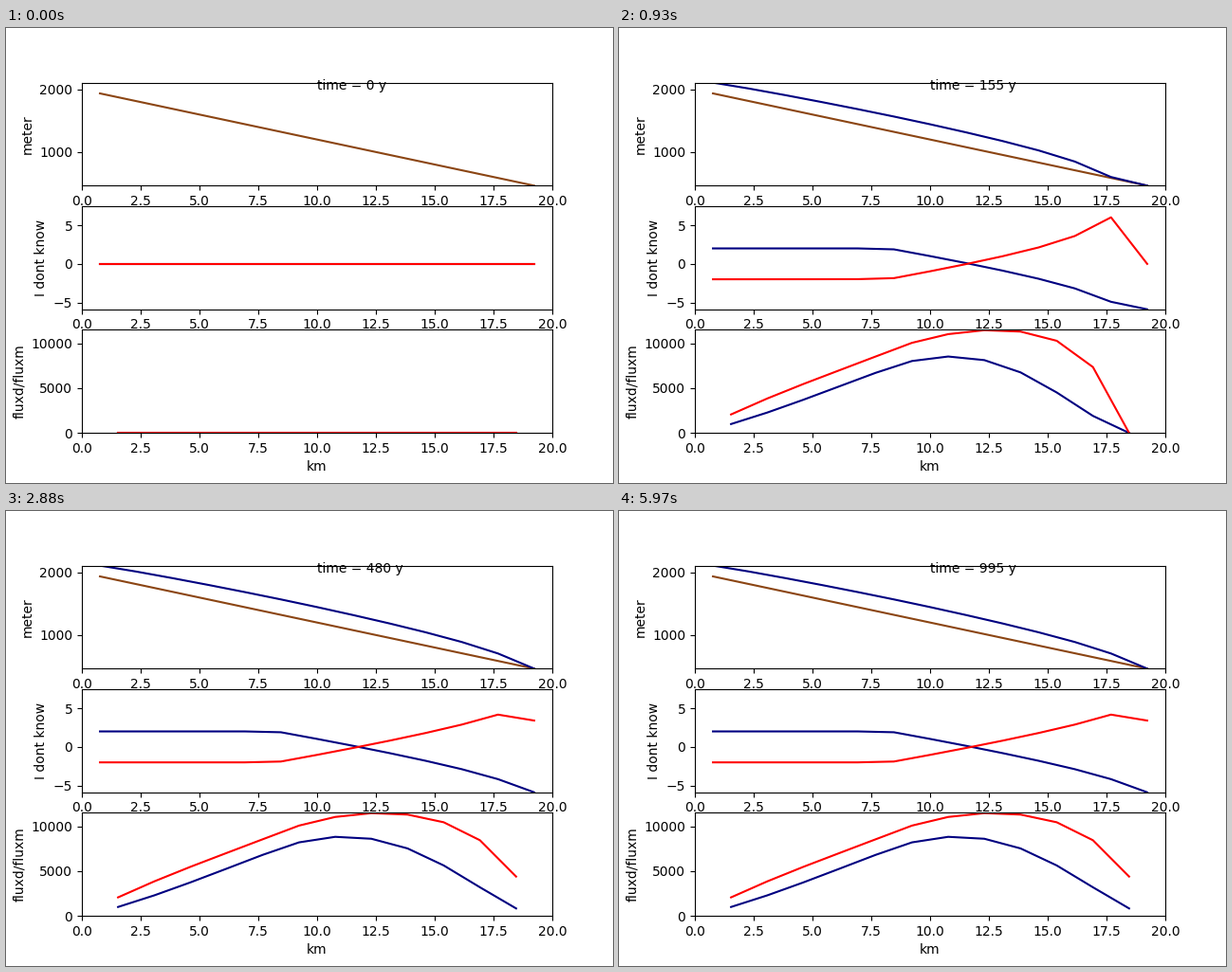
Recreate the animation shown at these times as a matplotlib script. Size 640x480 px, loop 6 s.

```python
import numpy as np
import matplotlib.pyplot as plt
from matplotlib.animation import FuncAnimation

# Glacier flow line on an inclined bed
N, LENGTH = 13, 20e3
DX = LENGTH / N
X = (np.arange(N) + 0.5) * DX
X_EDGE = np.arange(1, N) * DX
BED = 2000 - 0.08 * X

YEAR = 365 * 24 * 3600
RHO_G3 = (917 * 9.81) ** 3
DEFORM = 0.4 * 1.9e-24 * YEAR * RHO_G3
SLIDE = 5.7e-20 * YEAR * RHO_G3
ELA, GRADIENT, MAX_BALANCE = 1300, 0.007, 2

DT = 0.25
STEP_YEARS = 5
FRAMES = 200


def edge_mean(a):
    return (a[:-1] + a[1:]) / 2


def diagnose(ice):
    """Surface, mass balance, flux gain and both fluxes for a thickness."""
    surface = BED + ice
    balance = np.minimum(GRADIENT * (surface - ELA), MAX_BALANCE)
    slope3 = (-np.diff(surface) / DX) ** 3
    deform = DEFORM * edge_mean(ice ** 5) * slope3
    slide = SLIDE * edge_mean(ice ** 3) * slope3
    total = np.concatenate(([0], deform + slide, [0]))
    return surface, balance, -np.diff(total) / DX, deform, slide


def advance(ice, years):
    for _ in range(round(years / DT)):
        _, balance, gain, _, _ = diagnose(ice)
        ice = np.maximum(ice + DT * (balance + gain), 0)
    return ice


def initial_slab():
    """Uniform slab whose tongue is 126 m thick at 14.6 km in year 70."""
    low, high = 120.0, 200.0
    for _ in range(20):
        mid = (low + high) / 2
        if advance(np.full(N, mid), 70)[9] < 126:
            low = mid
        else:
            high = mid
    return np.full(N, mid)


def run():
    # The first picture is empty: nothing has been computed yet
    states = [(np.zeros(N),) * 3 + (np.zeros(N - 1),) * 2]
    ice = initial_slab()
    for _ in range(1, FRAMES):
        ice = advance(ice, STEP_YEARS)
        states.append(diagnose(ice))
    return states


states = run()

fig, (ax_top, ax_mid, ax_low) = plt.subplots(3, 1, figsize=(6.4, 4.8), dpi=100)
km, km_edge = X / 1000, X_EDGE / 1000

ax_top.plot(km, BED, color="saddlebrown")
surface_line, = ax_top.plot([], [], color="navy")
balance_line, = ax_mid.plot([], [], color="navy")
gain_line, = ax_mid.plot([], [], color="red")
deform_line, = ax_low.plot([], [], color="navy")
slide_line, = ax_low.plot([], [], color="red")
lines = [surface_line, balance_line, gain_line, deform_line, slide_line]
label = ax_top.text(10, 2000, "")

ax_top.set_ylim(BED.min(), states[-1][0].max())
ax_mid.set_ylim(GRADIENT * (BED.min() - ELA), 7.45)
ax_low.set_ylim(0, 11500)
for ax, name in zip((ax_top, ax_mid, ax_low),
                    ("meter", "I dont know", "fluxd/fluxm")):
    ax.set_xlim(0, 20)
    ax.set_ylabel(name)
ax_low.set_xlabel("km")


def draw(i):
    for line, values in zip(lines, states[i]):
        line.set_data(km if len(values) == N else km_edge, values)
    label.set_text(f"time = {i * STEP_YEARS} y")
    return lines + [label]


anim = FuncAnimation(fig, draw, frames=FRAMES, interval=30,
                     repeat=True, repeat_delay=0, blit=False)
plt.show()
```
